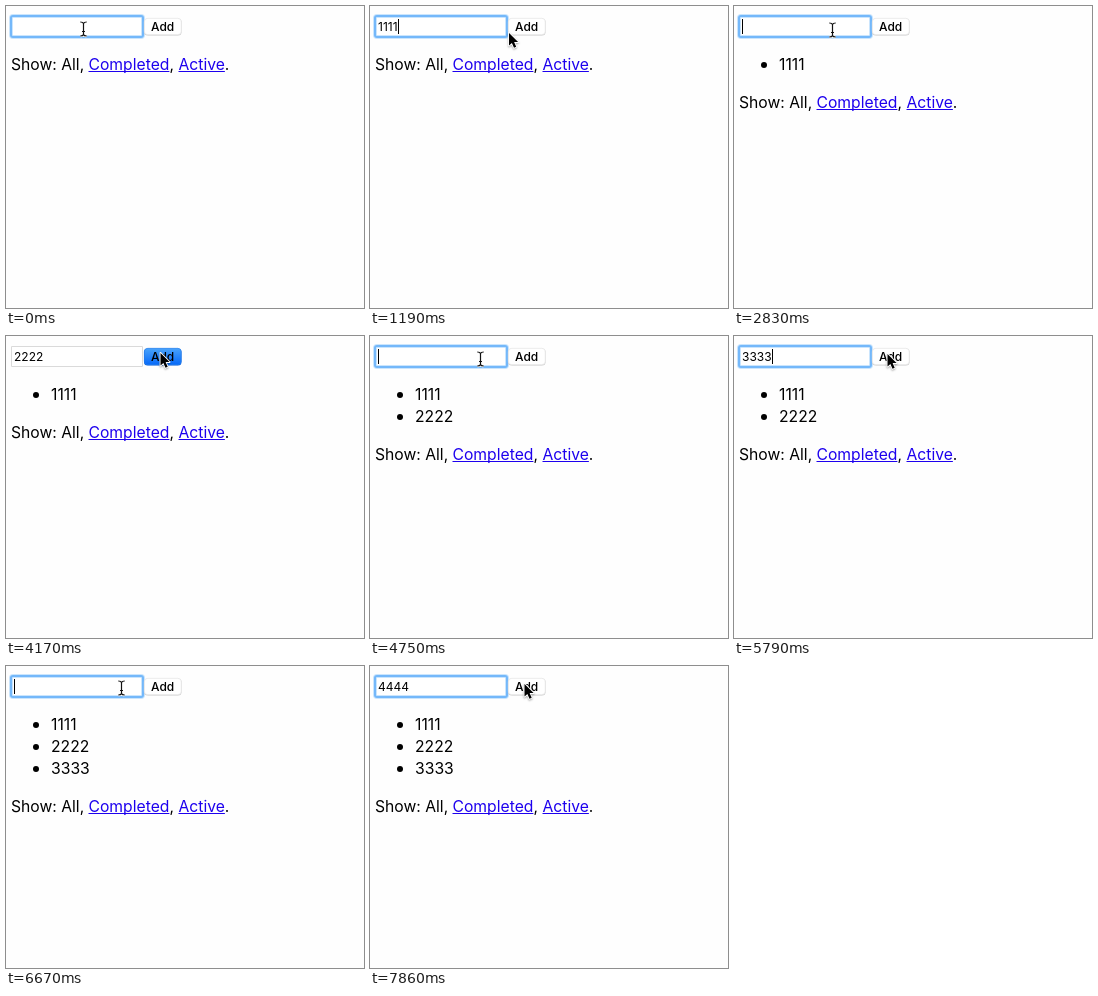
An HTML page with a canvas for the animation above (8000 ms loop, 358x302 px).

```html
<!DOCTYPE html>
<html lang="en">
<head>
<meta charset="utf-8">
<title>Todo list</title>
<style>
html, body { margin: 0; width: 100%; height: 100%; overflow: hidden; background: #fefefe; }
canvas { display: block; width: 358px; height: 302px; }
</style>
</head>
<body>
<canvas id="stage"></canvas>
<script>
const W = 358, H = 302, LOOP = 8000;
const canvas = document.getElementById('stage');
const ctx = canvas.getContext('2d');
const ratio = window.devicePixelRatio || 1;
canvas.width = W * ratio;
canvas.height = H * ratio;

// Each step changes a few fields of the state at a given time.
const steps = [];
const at = (time, change) => steps.push({ time, change });
const beam = (x, y) => ({ pointer: 'beam', x, y });
const arrow = (x, y) => ({ pointer: 'arrow', x, y });
const focus = { focused: true, caret: true };
const press = { pressed: true, focused: false, caret: false };
const added = items => ({ items, text: '', pressed: false });
const type = (digit, times) => times.forEach((time, i) =>
  at(time, { text: digit.repeat(i + 1), caret: true }));

at(0, { text: '', caret: false, focused: true, pressed: false, items: 0, ...beam(77.5, 23) });
type('1', [150, 300, 450, 590]);
at(740, { caret: false });
at(1040, beam(98.5, 24));
at(1190, { ...arrow(139, 27), caret: true });
at(1340, arrow(150, 26));
at(1490, arrow(152, 26));
at(1640, press);
at(1790, added(1));
at(2080, arrow(143, 30));
at(2230, arrow(113, 34));
at(2380, arrow(95, 33));
at(2830, { ...focus, ...beam(98.5, 24) });
type('2', [3280, 3430, 3580]);
at(3730, { text: '2222', ...arrow(143, 21) });
at(3870, arrow(154.5, 17));
at(4170, press);
at(4310, added(2));
at(4460, arrow(146, 20));
at(4600, beam(115.5, 23));
at(4750, { ...focus, ...beam(110.5, 23) });
type('3', [5050, 5200, 5350, 5490]);
at(5640, arrow(142, 21));
at(5790, arrow(153.5, 18));
at(5940, press);
at(6080, added(3));
at(6230, arrow(149, 19));
at(6380, beam(126.5, 22));
at(6520, beam(115.5, 22));
at(6670, focus);
type('4', [6970, 7120, 7270, 7410]);
at(7560, arrow(141, 20));
at(7710, arrow(152, 18));
at(7860, { ...arrow(154.5, 18), caret: false });

const stateAt = time => Object.assign({},
  ...steps.filter(s => s.time <= time).map(s => s.change));

function write(text, x, y, font, color = '#000') {
  ctx.font = `${font} Inter, sans-serif`;
  ctx.fillStyle = color;
  ctx.fillText(text, x, y);
  return ctx.measureText(text).width;
}

const BODY = '15.7px', FIELD = '12px', BUTTON = '500 12px';

function box(x, y, w, h, r) {
  ctx.beginPath();
  ctx.roundRect(x, y, w, h, r);
}

function outline(color, width) {
  ctx.strokeStyle = color;
  ctx.lineWidth = width;
  ctx.stroke();
}

function drawInput({ text, caret, focused }) {
  ctx.fillStyle = '#fff';
  ctx.fillRect(5, 10, 132, 21);
  if (focused) {
    box(5, 10, 132, 21, 2);
    outline('rgba(105,180,250,0.35)', 4);
    outline('#74b8fa', 2);
  } else {
    box(5.5, 10.5, 131, 20, 0);
    outline('#dadada', 1);
  }
  const width = write(text, 8, 25, FIELD);
  if (caret) {
    ctx.fillStyle = '#000';
    ctx.fillRect(Math.round(8 + width), 13, 1, 15);
  }
}

function drawButton(pressed) {
  box(138, 12.5, 37.5, 17, 3.5);
  ctx.fillStyle = pressed ? '#0a5fd6' : '#cbcbcb';
  ctx.fill();
  box(138.3, 12.3, 36.9, 16.4, 3.5);
  const fill = ctx.createLinearGradient(0, 12, 0, 29);
  fill.addColorStop(0, pressed ? '#4ba4fb' : '#fff');
  fill.addColorStop(1, pressed ? '#0568f8' : '#fff');
  ctx.fillStyle = fill;
  ctx.fill();
  outline(pressed ? '#2b84ee' : '#e2e2e2', 0.6);
  write('Add', 145, 25, BUTTON);
}

function drawList(items) {
  for (let i = 0; i < items; i++) {
    const y = 64 + 22 * i;
    ctx.fillStyle = '#000';
    ctx.beginPath();
    ctx.arc(30, y - 5, 3, 0, Math.PI * 2);
    ctx.fill();
    write(String(i + 1).repeat(4), 45, y, BODY);
  }
}

function drawFilters(items) {
  const y = items ? 80 + 22 * items : 64;
  const link = (label, x) => {
    const width = write(label, x, y, BODY, '#1d00ee');
    ctx.fillRect(x, y + 1, width, 1);
    return x + width;
  };
  write('Show: All,', 5, y, BODY);
  write(',', link('Completed', 82.5), y, BODY);
  write('.', link('Active', 172.5), y, BODY);
}

const arrowPath = new Path2D('M0 0V12.6L2.9 9.9L5 14.8L7.2 13.8L5.1 9.1H9.1Z');
const beamPath = new Path2D('M-3.2-7Q-.5-7 0-5.5Q.5-7 3.2-7M0-5.5V5.5M-3.2 7Q-.5 7 0 5.5Q.5 7 3.2 7M-1.5 2.5H1.5');

function drawPointer({ pointer, x, y }) {
  ctx.save();
  ctx.translate(x, y);
  ctx.lineJoin = 'round';
  if (pointer === 'beam') {
    ctx.strokeStyle = '#fff';
    ctx.lineWidth = 2.4;
    ctx.stroke(beamPath);
    ctx.strokeStyle = '#111';
    ctx.lineWidth = 1.2;
    ctx.stroke(beamPath);
  } else {
    ctx.shadowColor = 'rgba(0,0,0,0.35)';
    ctx.shadowBlur = 2 * ratio;
    ctx.shadowOffsetY = ratio;
    ctx.strokeStyle = '#fff';
    ctx.lineWidth = 1.8;
    ctx.stroke(arrowPath);
    ctx.shadowColor = 'transparent';
    ctx.fillStyle = '#000';
    ctx.fill(arrowPath);
  }
  ctx.restore();
}

function draw(time) {
  const state = stateAt(time);
  ctx.setTransform(ratio, 0, 0, ratio, 0, 0);
  ctx.fillStyle = '#fefefe';
  ctx.fillRect(0, 0, W, H);
  drawInput(state);
  drawButton(state.pressed);
  drawList(state.items);
  drawFilters(state.items);
  drawPointer(state);
}

const start = performance.now();
function tick() {
  draw((performance.now() - start) % LOOP);
  requestAnimationFrame(tick);
}
tick();
</script>
</body>
</html>
```
